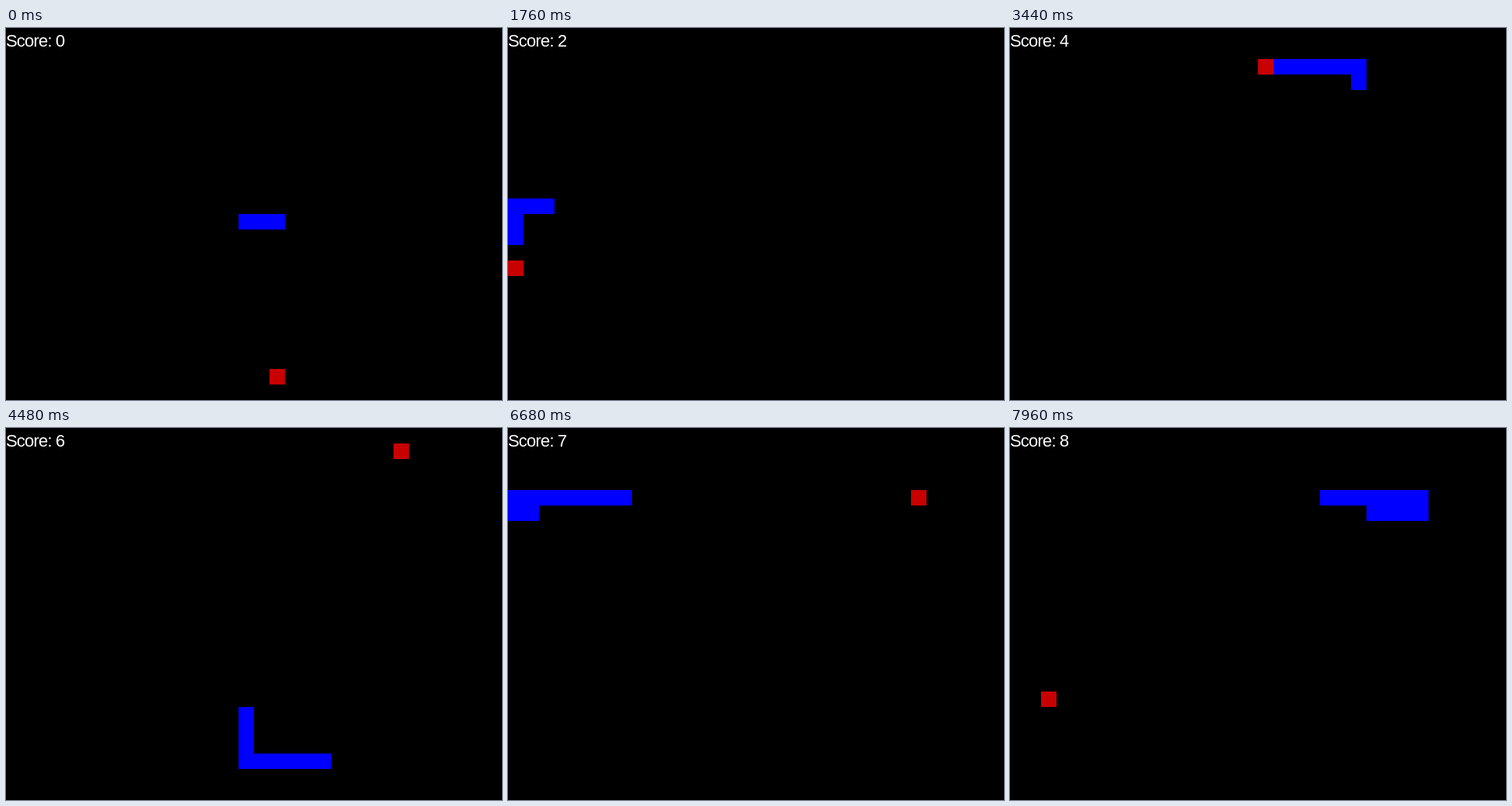
An HTML page with a canvas that plays this animation: 640 px wide and 480 px high, repeating every 8 s.

```html
<!DOCTYPE html>
<html lang="en">
<head>
<meta charset="utf-8">
<title>Snake</title>
<style>
  html, body { margin: 0; width: 100%; height: 100%; overflow: hidden; background: #000; }
  canvas { display: block; }
</style>
</head>
<body>
<canvas id="stage" width="640" height="480"></canvas>
<script>
const ctx = document.getElementById('stage').getContext('2d');
const CELL = 20, STEP_MS = 40, STEPS = 200, START_LENGTH = 3;

const at = (x, y, isFood = true) => ({ x, y, isFood });
const detour = (x, y) => at(x, y, false);

// Places the snake heads for, in order; only the food is eaten.
const goals = [
  at(17, 22), detour(17, 23), at(18, 11), at(0, 15), at(22, 13), at(16, 2), at(15, 21),
  at(25, 1), detour(24, 4), detour(0, 4), detour(0, 5), at(26, 4), at(2, 17)
];

// Keep the heading while it approaches the goal, otherwise turn towards it.
function steer(head, heading, goal) {
  const dx = Math.sign(goal.x - head.x), dy = Math.sign(goal.y - head.y);
  if (heading.x * dx + heading.y * dy > 0) return heading;
  return heading.x ? { x: 0, y: dy } : { x: dx, y: 0 };
}

// Play the whole game once and keep the state after each step.
function play() {
  let body = Array.from({ length: START_LENGTH }, (_, i) => ({ x: 17 - i, y: 12 }));
  let heading = { x: 1, y: 0 }, target = 0, score = 0;
  const states = [];
  while (states.length < STEPS) {
    states.push({ body, score, food: goals.slice(target).find(goal => goal.isFood) });
    const goal = goals[target];
    heading = steer(body[0], heading, goal);
    const head = { x: body[0].x + heading.x, y: body[0].y + heading.y };
    if (head.x === goal.x && head.y === goal.y) {
      target++;
      if (goal.isFood) score++;
    }
    body = [head, ...body].slice(0, START_LENGTH + score);
  }
  return states;
}

function fillCell({ x, y }, color) {
  ctx.fillStyle = color;
  ctx.fillRect(x * CELL, y * CELL, CELL, CELL);
}

function draw({ body, food, score }) {
  ctx.clearRect(0, 0, 640, 480);
  body.forEach(cell => fillCell(cell, '#00f'));
  fillCell(food, '#c80000');
  ctx.fillStyle = '#fff';
  ctx.fillText('Score: ' + score, 0, 24);
}

ctx.font = '22px "Liberation Sans", Arial, sans-serif';
ctx.letterSpacing = '-0.8px';

const states = play();
const start = performance.now();
function frame() {
  const elapsed = performance.now() - start;
  draw(states[Math.floor(elapsed / STEP_MS) % STEPS]);
  requestAnimationFrame(frame);
}
frame();
</script>
</body>
</html>
```
